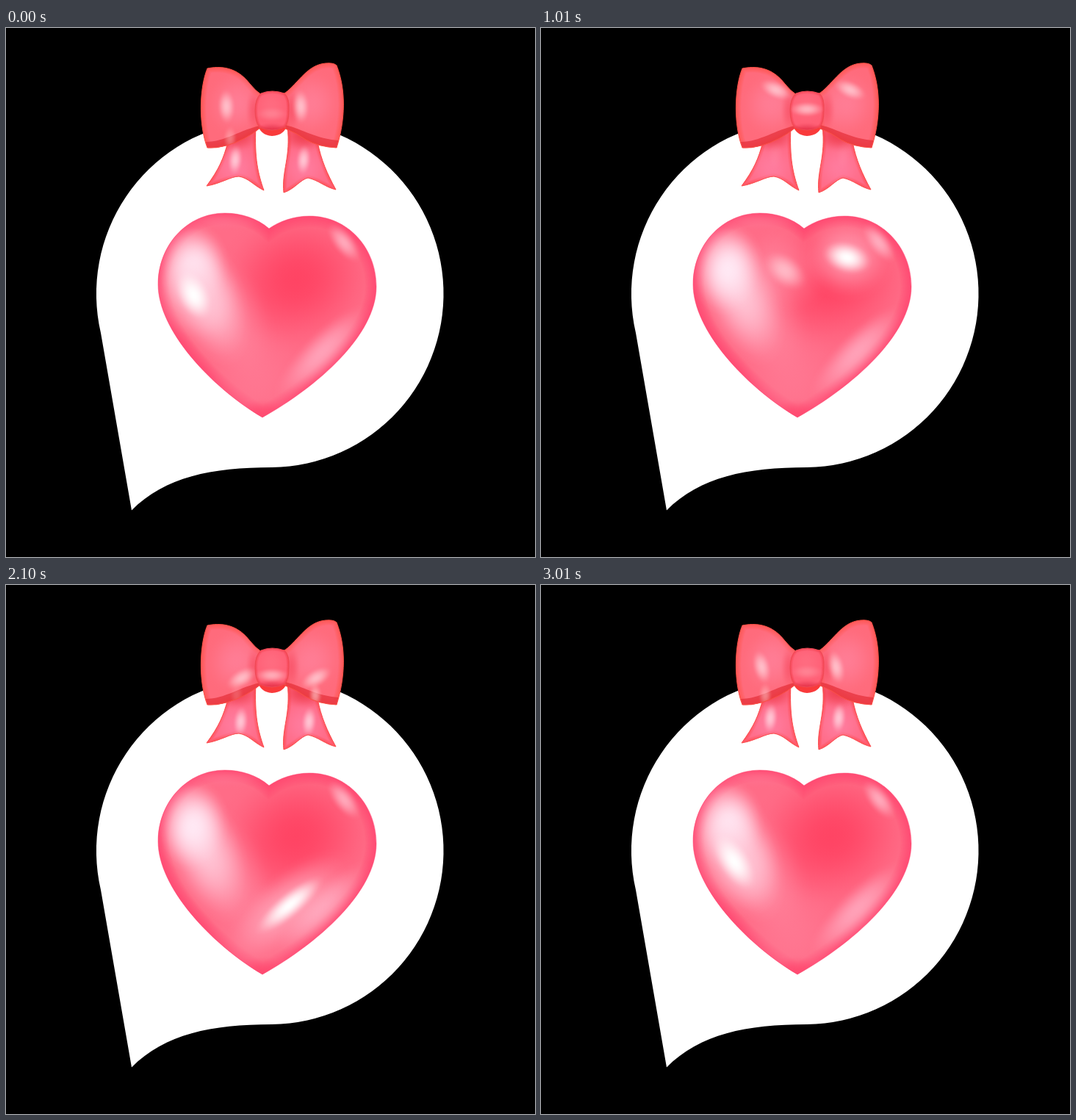
Recreate the animation shown at these times as an HTML page with a canvas. Size 720 by 720 pixels, loop 3100 ms.

```html
<!DOCTYPE html>
<html lang="en">
<head>
<meta charset="utf-8">
<title>Glossy heart</title>
<style>
html, body { margin: 0; width: 100%; height: 100%; overflow: hidden; background: #000; }
canvas { display: block; }
</style>
</head>
<body>
<canvas id="stage" width="720" height="720"></canvas>
<script>
const ctx = document.getElementById('stage').getContext('2d');
const LOOP = 3100;
const STEP = 83.3;
const WHITE = '255,255,255';

const bubble = new Path2D('M129 415 A236.300 236.300 0 1 1 362 598 C280 598 216 611 171 656.500 Z');
const heart = new Path2D('M358 273 C342 259 320 252 298 252 C246 252 207 296 207 349 C207 411 278 488 349 530 C424 488 504 418 504 352 C504 299 465 256 413 256 C392 256 372 263 358 273 Z');
const loopL = new Path2D('M274 55 C300 50 318 58 332 76 Q340 86 348 91 L346 136 Q325 153 300 160 Q286 164 274 163 C262 132 263 82 274 55 Z');
const loopR = new Path2D('M377 90 C395 80 408 50 435 48 Q446 47 450 51 C463 84 462 125 450 163 Q426 162 408 152 Q396 143 380 137 Z');
const underL = new Path2D('M272 155 C298 155 320 138 346 133 L346 138 Q325 153 300 161 L274 165 Z');
const underR = new Path2D('M380 132 C405 138 422 151 453 153 L450 165 Q426 163 408 153 L380 139 Z');
const tailL = new Path2D('M302 155 L340 134 C338 178 343 198 351 221 C338 215 330 204 317 202 C306 202 292 212 273 215 C290 192 296 178 302 155 Z');
const tailR = new Path2D('M383 134 L424 155 C429 180 437 198 449 220 C435 217 425 207 411 204 C401 206 392 220 378 224 C375 194 388 176 383 134 Z');
const knot = new Path2D('M347 89 Q362 83 379 89 Q386 95 385 112 Q385 130 379 135 Q362 143 345 135 Q339 128 339 112 Q339 96 347 89 Z');
const knotBase = new Path2D('M342 130 L383 130 Q380 146 362 147 Q346 146 342 130 Z');

// Track of the highlight over the right half, at equal angles from TOP to 90 degrees
const TOP = -130;
const track = [[320, 360], [358, 340], [408, 311], [453, 343], [423, 402], [352, 480], [423, 560]];

const clamp = v => Math.min(1, Math.max(0, v));
const sin = deg => Math.sin(deg * Math.PI / 180);
const cos = deg => Math.cos(deg * Math.PI / 180);

// Soft elliptical glow
function spot(x, y, rx, ry, deg, rgb, alpha) {
  const g = ctx.createRadialGradient(0, 0, 0, 0, 0, 1);
  for (let r = 0; r <= 1; r += 0.125) {
    g.addColorStop(r, `rgba(${rgb},${alpha * (1 - r * r) ** 2})`);
  }
  ctx.save();
  ctx.translate(x, y);
  ctx.rotate(deg * Math.PI / 180);
  ctx.scale(rx, ry);
  ctx.fillStyle = g;
  ctx.fillRect(-1, -1, 2, 2);
  ctx.restore();
}

// Fills a path, paints rim and shading inside it, then outlines it
function solid(path, fill, rim, rimWidth, outline, paint) {
  ctx.save();
  ctx.clip(path);
  ctx.fillStyle = fill;
  ctx.fill(path);
  ctx.strokeStyle = `rgba(${rim},.08)`;
  for (let w = rimWidth; w > 1; w -= rimWidth / 10) {
    ctx.lineWidth = w;
    ctx.stroke(path);
  }
  paint();
  ctx.restore();
  ctx.strokeStyle = outline;
  ctx.lineWidth = 1;
  ctx.stroke(path);
}

// Catmull-Rom point and tangent angle on the track
function onTrack(deg) {
  const u = clamp((deg - TOP) / (90 - TOP)) * (track.length - 3);
  const i = Math.min(track.length - 4, Math.floor(u));
  const f = u - i;
  const axis = k => {
    const [a, b, c, d] = track.slice(i, i + 4).map(p => p[k]);
    const p = (c - a) / 2, q = a - 2.5 * b + 2 * c - d / 2, r = (d - a + 3 * (b - c)) / 2;
    return { at: b + f * (p + f * (q + f * r)), slope: p + f * (2 * q + 3 * f * r) };
  };
  const x = axis(0), y = axis(1);
  return [x.at, y.at, Math.atan2(y.slope, x.slope) * 180 / Math.PI];
}

// Highlight on one half, for a light coming from the given angle
function halfLight(light) {
  const deg = (light % 360 + 540) % 360 - 180;
  const alpha = clamp((deg + 140) / 55) * clamp((97 - deg) / 12);
  if (!alpha) return;
  const [x, y, turn] = onTrack(deg);
  const low = clamp(deg / 90);
  const rx = 36 + 24 * clamp(low * 2.5);
  const ry = 23 - 11 * low * low;
  spot(x, y, rx * 1.8, ry * 2.6, turn, '255,196,212', alpha * 0.6);
  spot(x, y, rx, ry, turn, WHITE, alpha);
}

function drawHeart(light) {
  solid(heart, '#ff6c87', '255,60,108', 30, 'rgba(255,75,115,.5)', () => {
    spot(395, 343, 115, 100, -20, '255,64,96', 0.9);
    spot(340, 475, 75, 80, 0, '255,124,150', 0.65);
    spot(295, 385, 62, 105, -28, '255,145,168', 0.7);
    spot(270, 358, 54, 108, -22, '255,218,232', 0.75);
    spot(254, 328, 50, 64, 10, '255,238,249', 0.9);
    spot(430, 442, 90, 28, -45, '255,178,199', 0.75);
    spot(460, 292, 34, 16, 52, '255,190,205', 0.75);
    spot(292, 264, 62, 14, 0, '255,112,143', 0.6);
    spot(349, 526, 40, 22, 0, '255,70,108', 0.7);
    halfLight(light);
    ctx.translate(704, 0);
    ctx.scale(-1, 1);
    halfLight(180 - light);
  });
}

function drawTail(path, x, light) {
  solid(path, '#ff6c88', '255,70,66', 9, '#fb4b4b', () => {
    spot(x, 190, 36, 36, 0, '255,128,164', 0.75);
    spot(x, 146, 38, 24, 0, '236,52,66', 0.75);
    spot(x + 4 + 5 * cos(light), 179 + 8 * sin(light), 11, 22, 5, WHITE, 0.55 * clamp(1 + sin(light)));
  });
}

function drawLoop(path, under, x, brimX, brimAngle, light) {
  solid(path, '#ff6b7c', '255,84,64', 14, '#fb5148', () => {
    spot(x, 103, 44, 48, 20, '255,130,156', 0.75);
    spot((x + 362) / 2, 112, 13, 32, 0, '245,66,88', 0.5);
    spot(x + 14 * cos(light), 106 + 24 * sin(light), 25, 13, light + 90, WHITE, 0.5);
    ctx.fillStyle = 'rgba(230,50,60,.75)';
    ctx.fill(under);
    spot(brimX + 6 * cos(light), 150, 10, 18, 0, '255,215,215', 0.55 * clamp(cos(light - brimAngle)));
  });
}

function drawBow(light) {
  drawTail(tailL, 313, light);
  drawTail(tailR, 406, light);
  ctx.fillStyle = '#f93a3b';
  ctx.fill(knotBase);
  drawLoop(loopL, underL, 314, 311, 130, light);
  drawLoop(loopR, underR, 415, 418, 60, light);
  solid(knot, '#ff6076', '240,55,68', 7, '#ef4a55', () => {
    spot(361, 106, 25, 26, 0, '255,112,132', 0.7);
    spot(362, 139, 26, 11, 0, '225,45,70', 0.7);
    spot(362, 117 + 7 * sin(light), 26, 11, 0, WHITE, 0.15 + 0.4 * sin(light) ** 2);
  });
}

// One light circles the scene, in twelve poses per second
function draw(t) {
  const pose = Math.max(0, Math.floor((t - 10) / STEP));
  const light = 178 + 360 * pose * STEP / LOOP;
  ctx.fillStyle = '#000';
  ctx.fillRect(0, 0, 720, 720);
  ctx.fillStyle = '#fff';
  ctx.fill(bubble);
  drawHeart(light);
  drawBow(light);
}

const start = performance.now();
function tick() {
  draw((performance.now() - start) % LOOP);
  requestAnimationFrame(tick);
}
tick();
</script>
</body>
</html>
```
